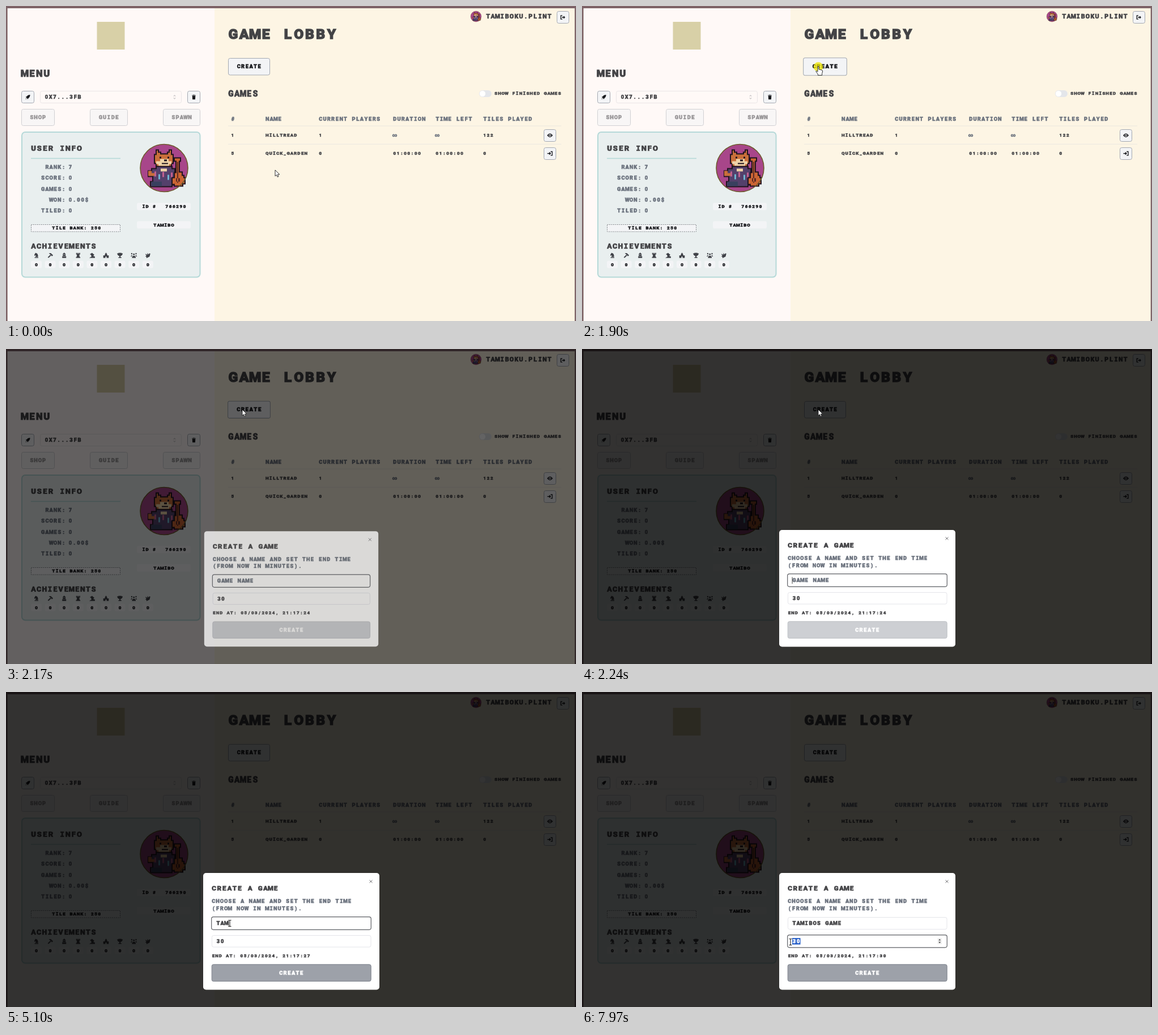
These frames come from a looping animation (1006 px wide and 557 px high, 8000 ms). An HTML page:

```html
<!DOCTYPE html>
<html lang="en">
<head>
<meta charset="utf-8">
<title>Game lobby</title>
<style>
html, body { margin: 0; width: 100%; height: 100%; overflow: hidden; background: #fdf5e4; }
svg { display: block; width: 100%; height: 100%; }
text { font-family: Roboto, "Liberation Sans", sans-serif; font-weight: 900; text-anchor: middle; font-kerning: none; }
.slab { font-family: "DejaVu Sans Mono", monospace; }
</style>
</head>
<body>
<svg id="stage" viewBox="0 0 1006 557" preserveAspectRatio="none"></svg>
<script>
const INK = '#434346', MUTED = '#69707c', BLACK = '#17181c', PALE = '#f3f4f6', LINE = '#a3a8b1';
const L = 9.07, M = 7.27, S = 6.23; // letter cells of the common text sizes
const LOOP = 8000;

// Every letter is centred in a cell of equal width; y is the middle of the capitals.
function txt(s, x, y, cell, fill = INK) {
  const size = cell * 1.28;
  const xs = [...s].map((_, i) => (x + cell * (i + .46)).toFixed(2));
  const letters = s.replace(/I/g, '<tspan class="slab">I</tspan>');
  return `<text x="${xs}" y="${(y + size * .355).toFixed(2)}" font-size="${size.toFixed(2)}" fill="${fill}" stroke="${fill}" stroke-width="${(size * .055).toFixed(2)}">${letters}</text>`;
}
const box = (x, y, w, h, r, fill, stroke = 'none', sw = 1, more = '') =>
  `<rect x="${x}" y="${y}" width="${w}" height="${h}" rx="${r}" fill="${fill}" stroke="${stroke}" stroke-width="${sw}" ${more}/>`;
const icon = (d, x, y, fill = '#3f4147', more = '') =>
  `<path d="${d}" transform="translate(${x} ${y})" fill="${fill}" fill-rule="evenodd" ${more}/>`;
const outline = (d, x, y, w = 1.3, color = BLACK) =>
  icon(d, x, y, 'none', `stroke="${color}" stroke-width="${w}"`);
const button = (x, y, w, h) => box(x + .5, y + .5, w - 1, h - 1, 3, PALE, LINE);

const clamp = v => Math.max(0, Math.min(1, v));
const ramp = (t, a, b) => clamp((t - a) / (b - a));

const badges = [
  'M-3 4.5H3.5V3.2H-3ZM-2 2.8Q0 0-1-.5L-3 1-3.5-1-1.5-4.5Q3.5-4 3 2.8Z',
  'M-4.5 3.2L.5-1.5 2-.2-3 4.6ZM-2.5-4H1L5-.2 3 1.6Z',
  'M0-5L3-2H-3ZM-2.5-1.5H2.5V1H-2.5ZM-3.5 1.5H3.5V4.5H-3.5Z',
  'M-3.5-4.5H-1.8V-3H-.8V-4.5H.8V-3H1.8V-4.5H3.5V-1.5H2L2.6 2.8H3.8V4.5H-3.8V2.8H-2.6L-2-1.5H-3.5Z',
  'M-4-2L0-4.5 4-1 2 1 5 2V4.5H-5L-1 2-2-1Z',
  'M0-5L2-2V0H4.8V4.5H1V2H-1V4.5H-4.8V0H-2V-2Z',
  'M-2.7-4.5H2.7V-3.8H4.8Q4.8 0 1 1V3H2.6V4.5H-2.6V3H-1V1Q-4.8 0-4.8-3.8H-2.7Z',
  'M-1.5-2a1.5 1.5 0 1 0 3 0a1.5 1.5 0 1 0-3 0ZM-5-3a1.2 1.2 0 1 0 2.4 0a1.2 1.2 0 1 0-2.4 0ZM2.6-3a1.2 1.2 0 1 0 2.4 0a1.2 1.2 0 1 0-2.4 0ZM-3.5 4.5Q-3 .5 0 .5 3 .5 3.5 4.5ZM-5.5 2Q-5-1-2.5-.5L-4 2ZM5.5 2Q5-1 2.5-.5L4 2Z',
  'M-4.5-3L-1-1V-4.5L1-1.5 2-3.5 4.8-3 3.8-1.5Q4 3 0 3.5L-2 5-2.5 3-4.5 1.5-2.5 1Z'
];

// Blocky portrait of a dog with a guitar, centred on 0,0
function portrait() {
  const dark = '#21141f', cream = '#efd3a8';
  const edge = `stroke="${dark}" stroke-width="2"`;
  const stripes = [-17, -10, -3, 6, 12].map((x, i) =>
    box(x, 6 + i * 5 % 9, 3, 9, 0, i % 2 ? '#6fb4d0' : '#c2608f')).join('');
  return '<circle r="42" fill="#a8468a"/>' +
    icon('M-14-3H14V1H19V8H22V30H14V33H-24V24H-20V15H-28V5H-22V1H-14Z', 0, 0, '#54406b', edge) +
    icon('M-28 5H-22V9H-17V14H-28Z', 0, 0, '#c96f3a') +
    box(-22, 24, 18, 8, 0, '#39405f') + stripes +
    icon('M-14-32H-10V-28H-6V-25H6V-28H9V-32H13V-24H16V-8H13V-3H-14V-8H-17V-24H-14Z', 0, 0, '#c96f3a', edge) +
    icon('M-14-12H-7V-16H8V-12H13V-7H9V-4H-10V-7H-14Z', 0, 0, cream) +
    icon('M-8-20H-5V-17H-8ZM6-20H9V-17H6ZM0-15H5V-12H0ZM-4-9H7V-7H-4Z', 0, 0, dark) +
    box(-6, 1, 11, 5, 0, cream) +
    icon('M18-18H29V-12H27V7H32V13H35V17H37V28H33V32H18V29H14V17H18V8H21V-12H18Z', 0, 0, '#cb6533', edge) +
    icon('M23-11H25V26H23ZM21 18H28V24H21Z', 0, 0, '#5a2a25') +
    '<circle r="42" fill="none" stroke="#6d5a2c" stroke-width="1.6"/>';
}

function sidebar() {
  let s = box(3, 4, 365, 553, 0, '#fff9f7') +
    box(160.5, 28, 49, 49, 0, '#d8d0a7') +
    txt('MENU', 27, 119.5, 12.95) +
    button(27, 150, 23, 22) + button(320, 150, 23, 22) +
    icon('M4-4Q0-4-2-1L-4 0-2.5 1-1 2.5 0 4 1 2Q4 0 4-4ZM-3 2L-4 4-2 3Z', 38.5, 161, BLACK) +
    icon('M-3.2-3.5H-1L-.5-4.2H.5L1-3.5H3.2V-2.5H-3.2ZM-2.8-2H2.8L2.4 4.3H-2.4Z', 331.5, 161, BLACK) +
    box(60.5, 150.5, 249, 21, 3, 'none', '#e9e5e6') + txt('0X7...3FB', 68, 160.5, M) +
    outline('M-1.7-1.5L0-3 1.7-1.5M-1.7 1.5L0 3 1.7 1.5', 297.5, 161, .8, '#8b8b90');

  s += '<g opacity=".5">' +
    [['SHOP', 27, 59, 42], ['GUIDE', 148, 67, 163.5], ['SPAWN', 277, 66, 292]].map(([name, x, w, tx]) =>
      button(x, 182, w, 30) + txt(name, tx, 196.5, M, '#33343a')).join('') + '</g>';

  s += box(28, 223, 314.5, 256.5, 6, '#e9efef', '#b5d9d8', 2) +
    txt('USER INFO', 44, 251.5, 10.1) + box(44, 268.7, 158, 1.6, 0, '#b5d9d8');
  [['RANK:', '7'], ['SCORE:', '0'], ['GAMES:', '0'], ['WON:', '0.00$'], ['TILED:', '0']].forEach(([k, v], i) => {
    const y = 284.5 + i * 19.4;
    s += txt(k, 105.5 - k.length * M, y, M, MUTED) + txt(v, 110, y, M, MUTED);
  });
  s += box(44.5, 386.5, 157, 12.5, 0, PALE, '#85888d', 1, 'stroke-dasharray="2 1.5"') +
    txt('TILE BANK: 250', 81, 391.8, S, BLACK) +
    `<g id="portrait" transform="translate(279 286.5)">${portrait()}</g>` +
    box(231, 348, 95, 13, 3, PALE) + txt('ID #', 240, 354.5, S, BLACK) + txt('766290', 281, 354.5, S, BLACK) +
    box(231, 380.5, 95, 13, 3, PALE) + txt('TAMIBO', 260, 386.8, S, BLACK) +
    txt('ACHIEVEMENTS', 44, 424.5, 9.65);
  badges.forEach((d, i) => {
    const x = 53.5 + i * 24.6;
    s += icon(d, x, 441) + box(x - 9.5, 450.5, 19, 13, 3, PALE) + txt('0', x - 2.9, 457, S, BLACK);
  });
  return s;
}

function lobby() {
  const cols = [397, 458, 552, 683, 758, 842];
  const row = (cells, y, cell, fill) => cells.map((c, i) => txt(c, cols[i], y, cell, c === '∞' ? MUTED : fill)).join('');
  const tint = (id, y) => box(392, y, 588, 31, 0, '#f1f5f9', 'none', 0, `id="${id}" opacity="0"`);
  return txt('GAME LOBBY', 392, 49, 19.3) +
    '<g transform="translate(829.5 18.5) scale(.225)"><use href="#portrait" transform="translate(-279 -286.5)"/></g>' +
    txt('TAMIBOKU.PLINT', 847, 18.5, 8.33) +
    button(972, 9, 22, 22) + outline('M-1-3.2H-3.8V3.2H-1', 983, 20) +
    icon('M-2-.7H1V-2.8L4 0 1 2.8V.7H-2Z', 983, 20, BLACK) +
    `<g id="create">${button(392, 92, 74, 30.5)}${txt('CREATE', 407.5, 106.7, M, BLACK)}</g>` +
    txt('GAMES', 392, 154.8, 10.75) +
    box(835, 149, 22, 12, 6, '#e4e6ea') + '<circle cx="841" cy="155" r="5.2" fill="#fff"/>' +
    txt('SHOW FINISHED GAMES', 862, 154.5, S) +
    tint('row1', 212.5) + tint('row2', 244.5) +
    row(['#', 'NAME', 'CURRENT PLAYERS', 'DURATION', 'TIME LEFT', 'TILES PLAYED'], 200, M, MUTED) +
    box(392, 211.5, 588, 1, 0, '#ebe8e0') + box(392, 243.8, 588, 1, 0, '#ebe8e0') +
    row(['1', 'HILLTREAD', '1', '∞', '∞', '122'], 228, S) +
    row(['5', 'QUICK_GARDEN', '0', '01:00:00', '01:00:00', '0'], 260, S) +
    button(949, 218, 22, 22) + icon('M-5 0Q0-7 5 0Q0 7-5 0ZM-2.2 0a2.2 2.2 0 1 0 4.4 0a2.2 2.2 0 1 0-4.4 0Z', 960, 228.8, BLACK) +
    `<circle cx="960" cy="228.8" r="1.2" fill="${BLACK}"/>` +
    button(949, 250, 22, 22) + outline('M1.2-3.3H4V3.3H1.2', 960, 260.8) +
    icon('M-4.5-.8H-1.2V-3L2 0-1.2 3V.8H-4.5Z', 960, 260.8, BLACK);
}

const $ = id => document.getElementById(id);
$('stage').innerHTML = box(0, 0, 1006, 557, 0, '#fdf5e4') + sidebar() + lobby() +
  '<path d="M0 0H1006V557H1003.7V4H2.6V557H0Z" fill="#7d6367"/>' +
  box(0, 0, 1006, 557, 0, '#000', 'none', 0, 'id="veil"') +
  '<g id="dialog"></g><g id="pointer"></g>';

// Pointer waypoints: time, x, y
const route = [
  [70, 475, 290], [380, 452, 214], [620, 424, 118], [720, 417, 82], [830, 416, 101], [970, 417, 107],
  [2300, 417, 107], [2520, 408, 180], [2860, 384, 376], [3150, 390, 412], [3410, 395, 409],
  [6900, 395, 409], [7300, 411, 441], [7430, 411, 441], [7700, 372, 442], [7830, 366, 442], [7960, 368, 442]
];
function pointerAt(t) {
  const i = route.findIndex(p => p[0] > t);
  if (i === 0) return route[0].slice(1);
  if (i < 0) return route[route.length - 1].slice(1);
  const [a, b] = [route[i - 1], route[i]], k = ramp(t, a[0], b[0]);
  return [a[1] + (b[1] - a[1]) * k, a[2] + (b[2] - a[2]) * k];
}

const ARROW = 'M0 0V10.8L2.5 8.6 4.1 12.3 6 11.5 4.4 7.9H7.8Z';
const HAND = 'M-1 0Q0-1.2 1 0V5L6 6.2Q8 6.6 7.6 9L6.6 12.5V15.5H-.6V13.5L-4 9Q-4.4 7.4-2.8 7.8L-1 9.3Z';
const BEAM = 'M-2.5-5.5H-.8L0-4.8 .8-5.5H2.5M0-4.8V4.8M-2.5 5.5H-.8L0 4.8 .8 5.5H2.5';

function pointer(t, x, y) {
  const down = t >= 1900 && t < 2100 || t >= 7430 && t < 7960;
  const onField = t > 2240 && x > 363 && (Math.abs(y - 409) < 11 || Math.abs(y - 440.5) < 11);
  const onButton = t > 600 && t < 2100 && x > 390 && x < 467 && y > 91 && y < 123;
  const shape = d => icon(d, x, y, '#fff', 'stroke="#1c1c1e" stroke-width=".9" stroke-linejoin="round"');
  return (down ? `<circle cx="${x}" cy="${y + .5}" r="8.3" fill="#eee500" opacity=".75"/>` : '') +
    (onField ? outline(BEAM, x, y, 2.2, '#fff') + outline(BEAM, x, y, 1.1, '#222') : shape(onButton ? HAND : ARROW));
}

const NAME = 'TAMIBOS GAME';
const keys = [4680, 4890, 5100, 5230, 5430, 5500, 5580, 5760, 5960, 6160, 6230, 6430];

function dialog(t, x) {
  const typed = keys.filter(k => k <= t).length;
  const second = t >= 7430;
  const since = second ? 7430 : typed ? keys[typed - 1] : 2220;
  const lit = t >= since && Math.floor((t - since) / 500) % 2 === 0;
  const picked = !second ? 0 : x < 373 ? 2 : x < 380 ? 1 : 0;
  const seconds = 24 + Math.max(0, Math.floor((t - 1650) / 1000));
  const field = (y, h, focus) => focus
    ? box(362.7, y - .3, 281.6, h + .6, 3.5, '#fff', '#5d5f64', 1.2)
    : box(363.5, y + .5, 280.5, h - 1, 3, '#fff', '#e4e5ea');
  const caret = (cx, y) => box(cx - .4, y - 5.5, .9, 12, 0, '#333');

  let s = box(348, 320, 311, 206.5, 5, '#fff') +
    outline('M-2.5-2.5L2.5 2.5M2.5-2.5L-2.5 2.5', 644, 335, 1, '#77777b') +
    txt('CREATE A GAME', 363, 347.2, L) +
    txt('CHOOSE A NAME AND SET THE END TIME', 363, 370, M, MUTED) +
    txt('(FROM NOW IN MINUTES).', 363, 382.2, M, MUTED) +
    field(398, 22, !second) + field(430, 21.5, second) +
    (typed ? txt(NAME.slice(0, typed), 371, 408.7, M) : txt('GAME NAME', 371, 408.7, M, MUTED));
  if (lit && !second) s += caret(371 + typed * M, 408.7);
  if (picked) s += box(371 + (2 - picked) * M, 435, picked * M, 11.5, 0, '#2b62c9');
  [...'30'].forEach((c, i) => s += txt(c, 371 + i * M, 440.5, M, i >= 2 - picked ? '#fff' : INK));
  if (second) {
    if (lit && !picked) s += caret(386, 440.5);
    s += box(627.5, 435, 7.5, 11, 0, '#efefef') + icon('M-2-1.2L0-3.7 2-1.2ZM-2 1.2L0 3.7 2 1.2Z', 631.2, 440.5, '#444');
  }
  return s + txt(`END AT: 05/03/2024, 21:17:${seconds}`, 363, 466, S) +
    `<g opacity="${.5 + .5 * ramp(t, 4640, 4900)}">${box(363.2, 481.8, 281, 29.7, 3, '#9da1a9', '#7d828c')}</g>` +
    txt('CREATE', 482, 496.2, M, '#fff');
}

function render(t) {
  const [x, y] = pointerAt(t);
  const step = Math.floor(t / 70) * 70;
  const open = t < 2100 ? 0 : 1 - (1 - ramp(step, 2056, 2240)) ** 1.5;
  const grow = 1 + .05 * ramp(t, 650, 830) * (1 - ramp(step, 2100, 2240));

  $('create').setAttribute('transform', `translate(429 107) scale(${grow}) translate(-429 -107)`);
  $('row1').setAttribute('opacity', y > 212 && y < 244 && t < 1000 ? .5 : 0);
  $('row2').setAttribute('opacity', y >= 244 && y < 276 && t < 1000 ? .5 : 0);
  $('veil').setAttribute('opacity', .8 * open);

  const panel = $('dialog');
  panel.setAttribute('opacity', open);
  panel.setAttribute('transform',
    `translate(503.5 ${423 + 4.1 * (1 - open)}) scale(${.95 + .05 * open}) translate(-503.5 -423)`);
  panel.innerHTML = open ? dialog(t, x) : '';
  $('pointer').innerHTML = pointer(t, x, y);
}

let start;
function frame(now) {
  start ??= now;
  render((now - start) % LOOP);
  requestAnimationFrame(frame);
}
render(0);
requestAnimationFrame(frame);
</script>
</body>
</html>
```
